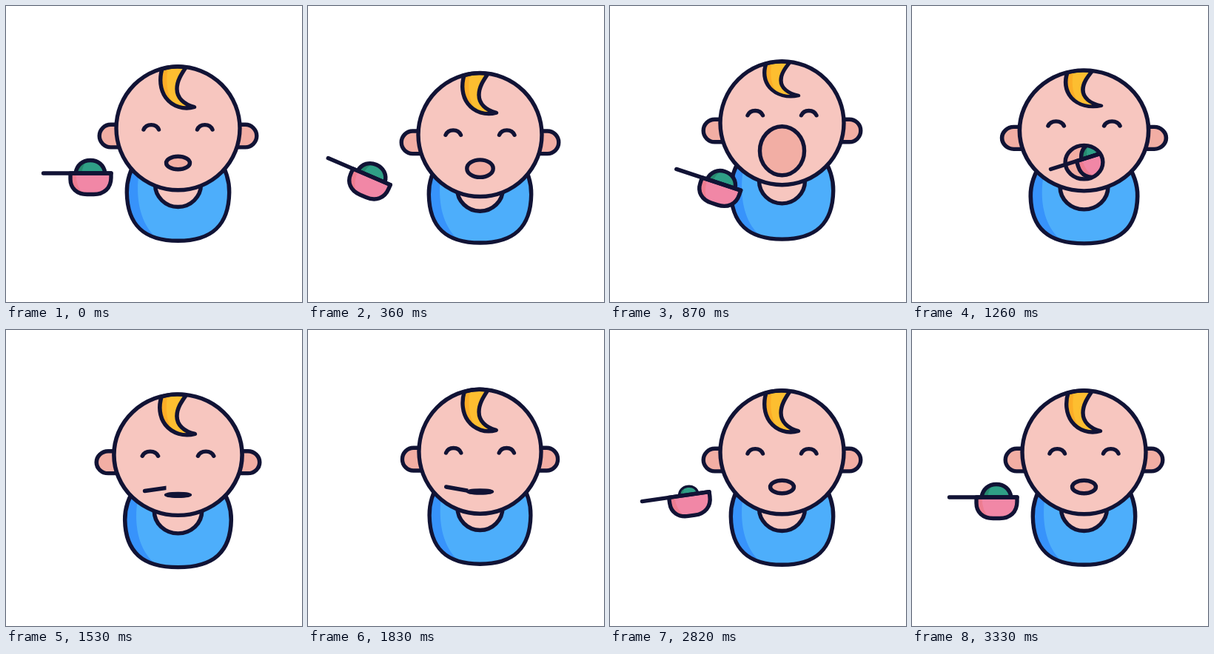
Animation, 400 px wide and 400 px high, one loop 5.63 s. Source, as an HTML page:

```html
<!DOCTYPE html>
<html lang="en">
<head>
<meta charset="utf-8">
<title>Feeding time</title>
<style>
  html, body { margin: 0; width: 100%; height: 100%; overflow: hidden; background: #fff; }
  svg { display: block; width: 100%; height: 100%; }
  .line { fill: none; stroke: #111335; stroke-width: 5.4; stroke-linecap: round; stroke-linejoin: round; }
  .skin { fill: #f7c6bf; }
  .blush { fill: #f2aea4; }
</style>
</head>
<body>
<svg viewBox="0 0 400 400">
  <defs>
    <path id="bibShape" d="M178 205C167 222 163 236 163.300 252C164 296 186 317.300 232.500 317.300S301 296 301.700 252C302 236 298 222 287 205Z"/>
    <path id="hairShape" d="M211 85C207 98 208 113 216 124C225 136 240 140.500 254.500 136.500C240 133 231 124 231 112C231 101 237 92 243 83Q227 80 211 85Z"/>
    <path id="bowlShape" d="M36.500 0H91.500V6C91.500 20 82 28.500 68 28.500H59C45 28.500 36.500 20 36.500 8Z"/>
    <path id="foodShape" d="M43.500 0C45 -11 53 -17.500 63.500 -17.500S82 -11 83.500 0Z"/>
    <path id="earShape" d="M156 160.300H141.500A15.300 15.300 0 0 0 141.500 190.900H156Z"/>
    <clipPath id="bibClip"><use href="#bibShape"/></clipPath>
    <clipPath id="hairClip"><use href="#hairShape"/></clipPath>
    <clipPath id="bowlClip"><use href="#bowlShape"/></clipPath>
    <clipPath id="foodClip"><use href="#foodShape"/></clipPath>
    <clipPath id="spoonClip">
      <rect id="outside" height="400"/>
      <ellipse id="opening"/>
    </clipPath>
  </defs>

  <g id="body">
    <use href="#bibShape" fill="#4daefb"/>
    <path clip-path="url(#bibClip)" fill="#3793fb" d="M150 200H186C172 240 174 298 213 320H150Z"/>
    <use href="#bibShape" class="line"/>
  </g>
  <g id="neck">
    <path class="skin" d="M201.500 236V241A31 30.500 0 0 0 263.500 241V236Z"/>
    <path class="line" d="M201.500 236V241A31 30.500 0 0 0 263.500 241V236"/>
  </g>
  <g id="head">
    <g id="ear">
      <use href="#earShape" class="blush"/>
      <use href="#earShape" class="line"/>
    </g>
    <use href="#ear" transform="matrix(-1 0 0 1 465 0)"/>
    <circle class="skin" cx="232.500" cy="165.300" r="83.500"/>
    <g id="hair">
      <use href="#hairShape" fill="#fdbe30"/>
      <path clip-path="url(#hairClip)" fill="#fcad27" d="M200 78H220C215 100 216 124 233 142H200Z"/>
      <use href="#hairShape" class="line"/>
    </g>
    <circle class="line" cx="232.500" cy="165.300" r="83.500"/>
    <path id="eyes" class="line" d="M186 167C189.500 158.500 203 158.500 206.500 167M258.500 167C262 158.500 275.500 158.500 279 167"/>
  </g>

  <ellipse id="mouthFill" class="blush"/>
  <g clip-path="url(#spoonClip)">
    <g id="spoon">
      <g id="food">
        <use href="#foodShape" fill="#2f9f86"/>
        <path clip-path="url(#foodClip)" fill="#27896f" d="M40 -20H62Q52 -12 52 2H40Z"/>
        <use href="#foodShape" class="line"/>
      </g>
      <use href="#bowlShape" fill="#f187a6"/>
      <path clip-path="url(#bowlClip)" fill="#ee7d91" d="M34 0H44Q44 20 56 30H34Z"/>
      <use href="#bowlShape" class="line"/>
      <path class="line" d="M0 0H91.500"/>
    </g>
  </g>
  <ellipse id="mouthLine" class="line"/>
</svg>

<script>
const LOOP = 5630, STEP = 30, END = 3330, CX = 232.5;
const $ = id => document.getElementById(id);

const setAll = (id, attributes) => {
  for (const name in attributes) $(id).setAttribute(name, attributes[name]);
};
const place = (id, transform) => setAll(id, { transform });
const scaleAbout = (x, y, sx, sy, dy = 0) =>
  `translate(${x} ${y + dy}) scale(${sx} ${sy}) translate(${-x} ${-y})`;

function draw(t) {
  // ease: 0 to 1 between two times; hump: 0 to 1 and back.
  const ease = (from, to) => {
    const u = Math.min(Math.max((t - from) / (to - from), 0), 1);
    return u * u * (3 - 2 * u);
  };
  const hump = (from, to) => t > from && t < to ? Math.sin(Math.PI * (t - from) / (to - from)) ** 2 : 0;

  // Phases of the bite.
  const back = ease(0, 440);
  const feed = ease(600, 1225);
  const leave = ease(1800, 2480);
  const home = ease(2450, 3200);
  const open = ease(200, 950) - ease(1130, 1455);
  const shut = ease(1150, 1450) - ease(1900, 2700);
  const lean = ease(600, 1020) - ease(1130, 1290);
  const bounce = hump(1150, 1630) - .12 * hump(1630, 1980);
  const gulp = hump(1830, 2430);

  // The head leads, the body follows with a part of its nod.
  const nod = 9.2 * hump(0, 840) - 10 * lean;
  const headY = nod + 9 * bounce + 8 * gulp;
  const bodyY = .31 * nod + 9 * bounce + 5.5 * gulp;
  const wide = 1 + .1 * bounce, tall = 1 - .055 * bounce;

  place('body', scaleAbout(CX, 317, wide, tall, bodyY));
  place('neck', scaleAbout(CX, 271, wide, tall, (headY + bodyY) / 2));
  place('head', scaleAbout(CX, 165, wide, tall, headY));
  place('hair', scaleAbout(CX, 84, 1, 1 - .165 * open));
  place('eyes', `translate(0 ${-12.5 * open})`);

  const mouth = {
    cx: CX,
    cy: 212 + headY - 9.5 * open + 7.5 * shut,
    rx: 16 + 14.5 * open,
    ry: 8.8 + 25 * open - 7.3 * shut
  };
  for (const id of ['mouthFill', 'mouthLine', 'opening']) setAll(id, mouth);
  setAll('outside', { width: CX - mouth.rx });

  const x = 50.5 - 25.5 * back + 162.5 * feed - 147 * leave + 10 * ease(2550, 3300);
  const y = 226 - 22.5 * back + 17 * ease(600, 880) - 8.5 * ease(1350, 1800)
    + 25 * ease(1830, 2330) - 11 * home;
  const turn = 25.5 * back - 43.5 * ease(720, 1300) + 28 * ease(1350, 1800)
    - 26 * ease(1850, 2330) + 16 * home;
  place('spoon', `translate(${x} ${y}) rotate(${turn})`);

  const portion = t < 1600 ? 1 : ease(2640, 2940);
  place('food', scaleAbout(63.5, 0, portion, portion));
  $('food').style.display = portion ? '' : 'none';
}

function tick() {
  const t = performance.now() % LOOP;
  draw(Math.min(Math.floor(t / STEP) * STEP, END));
  requestAnimationFrame(tick);
}
tick();
</script>
</body>
</html>
```
